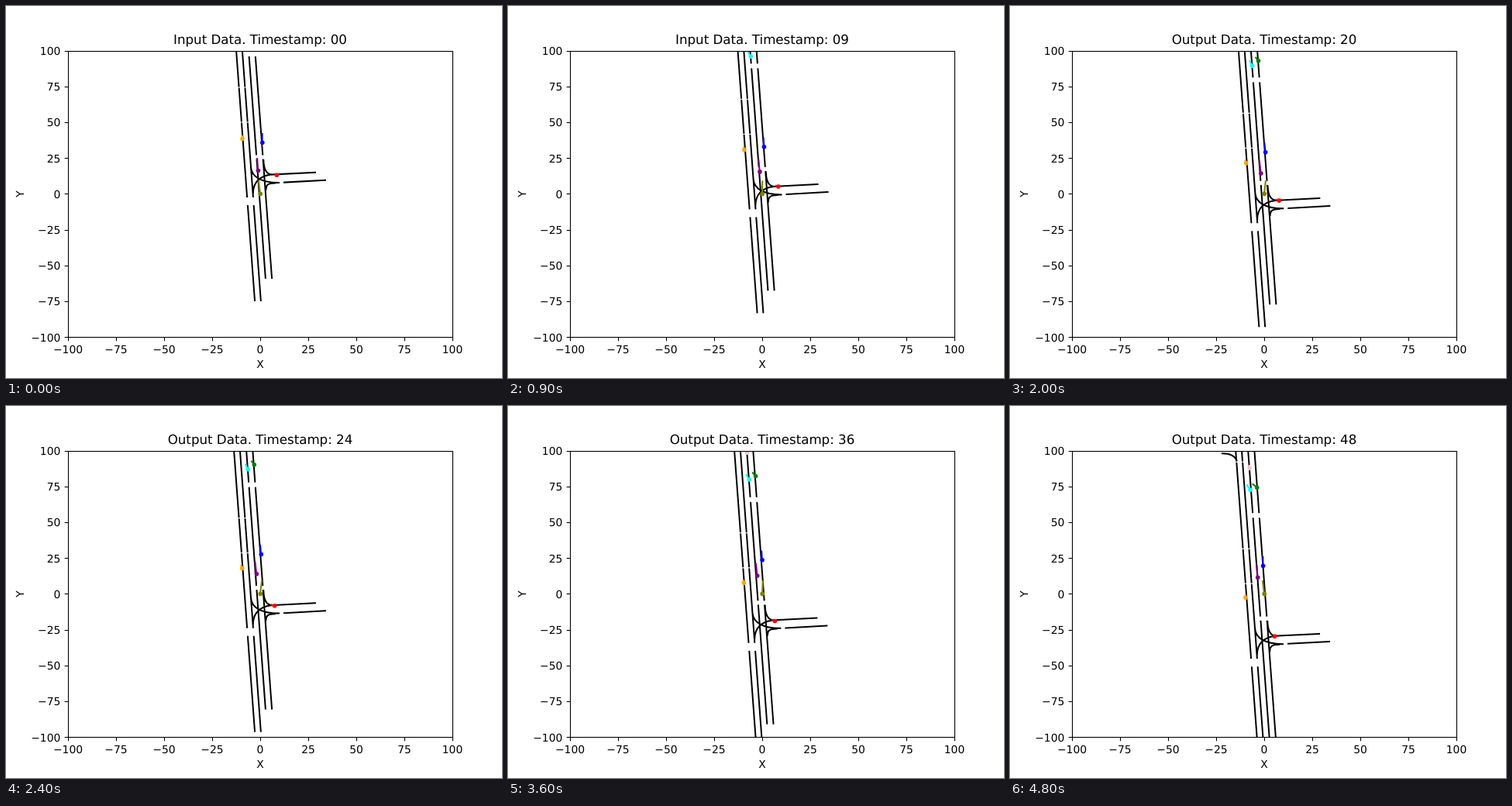
An HTML page with a canvas for the animation above (4.9 s loop, 640 px wide and 480 px high).

```html
<!DOCTYPE html>
<html lang="en">
<head>
<meta charset="utf-8">
<title>Trajectory plot</title>
<style>
html, body { margin: 0; width: 100%; height: 100%; overflow: hidden; background: #fff; }
canvas { display: block; }
</style>
</head>
<body>
<canvas id="plot" width="640" height="480"></canvas>
<script>
const ctx = document.getElementById('plot').getContext('2d');
const STEP = 100, COUNT = 49, LAST = COUNT - 1, INPUT_STEPS = 20;
const SLOPE = .0742;
const FONT = '"DejaVu Sans", sans-serif';

// Start, travel and trailing line (lean, swing of the lean, height), in pixels
const agents = [
  { color: 'orange', x: 304.8, y: 171, dx: -1, dy: 76, lean: 0, swing: -1, rise: 3 },
  { color: 'blue', x: 330.6, y: 176, dx: -4.2, dy: 30, lean: 0, swing: -1, rise: 11 },
  { color: 'purple', x: 325.2, y: 212, dx: -5.7, dy: 9, lean: -1, swing: -.7, rise: 15 },
  { color: 'red', x: 349.2, y: 218, dx: -7.8, dy: 79, lean: -1, swing: -3, rise: 1 },
  { color: 'green', x: 321, y: 46, dx: -2.5, dy: 59, lean: -5, swing: 2, rise: 4 },
  { color: 'cyan', x: 313.3, y: 55, dx: -3.5, dy: 53, lean: -4, swing: 1, rise: 6 },
  { color: 'pink', x: 307, y: 0, dx: 2, dy: 80, lean: 0, swing: -1, rise: 3 },
  { color: 'olive', x: 328, y: 242.2, dx: 0, dy: 0, lean: -2, swing: 4, rise: 16 }
];

// A lane slants from the top down to `end`, interrupted by gaps [centre, length]
function lane(x0, end, gaps) {
  let path = '', y = -30;
  const point = v => `${x0 + SLOPE * v} ${v}`;
  for (const [mid, gap] of [...gaps, [end, 0]]) {
    path += `M${point(y)}L${point(mid - gap / 2)}`;
    y = mid + gap / 2;
  }
  return path;
}

const westGaps = [[-7, 3], [105, 3], [150, 3], [252, 12]];
const eastGaps = [[62, 8], [195, 7]];
const curves = `
  M274-18C283-18 290-15 292.5-9
  M341 217.6L399 214.7M359 227.6L412 224.7
  M316 208C317 219 326 227.6 352 228
  M342 217.6C328 219.5 319 226 318.8 242
  M335.3 237C335.3 231 338 228.6 347 228.6
  M332.3 199C332.6 211 336 217.6 344 217.6`;
const map = new Path2D(
  lane(292.8, 380, westGaps) + lane(300.6, 380, westGaps) +
  lane(308.8, 351, eastGaps) + lane(317, 351, eastGaps) + curves);

function line(x1, y1, x2, y2) {
  ctx.beginPath();
  ctx.moveTo(x1, y1);
  ctx.lineTo(x2, y2);
  ctx.stroke();
}

function text(str, x, y, size = 13.89, align = 'center') {
  ctx.font = `${size}px ${FONT}`;
  ctx.textRendering = 'geometricPrecision';
  ctx.textAlign = align;
  ctx.fillText(str, x, y);
}

function drawMap(n) {
  const wave = .6 * Math.sin(2 * Math.PI * n / LAST);
  ctx.save();
  ctx.translate(wave, 1.65 * n + wave);
  ctx.strokeStyle = '#000';
  ctx.stroke(map);
  ctx.restore();
}

function drawAgent(a, n) {
  const u = n / LAST;
  const x = a.x + a.dx * u ** 1.5, y = a.y + a.dy * u;
  ctx.strokeStyle = ctx.fillStyle = a.color;
  line(x, y, x + a.lean + a.swing * Math.sin(Math.PI * u), y - a.rise);
  ctx.beginPath();
  ctx.arc(x + .2, y + .2, 2.8, 0, 7);
  ctx.fill();
}

function drawAxes() {
  ctx.strokeStyle = ctx.fillStyle = '#000';
  ctx.lineWidth = 1.1;
  ctx.strokeRect(80.5, 58.5, 496, 369);
  for (let i = 0; i <= 8; i++) {
    const label = String(i * 25 - 100).replace('-', '\u2212');
    const x = 80 + 62 * i, y = 427.2 - 46.2 * i, row = Math.round(y) + .5;
    line(x + .5, 427.5, x + .5, 432.3);
    line(75.6, row, 80.5, row);
    text(label, x, 448);
    text(label, 70.3, Math.round(y + 5.3), 13.89, 'right');
  }
  text('X', 328, 467);
  ctx.save();
  ctx.translate(23, 242.4);
  ctx.rotate(-Math.PI / 2);
  text('Y', 0, 0);
  ctx.restore();
}

function draw(n) {
  ctx.fillStyle = '#fff';
  ctx.fillRect(0, 0, 640, 480);
  ctx.save();
  ctx.beginPath();
  ctx.rect(80, 58, 496, 369);
  ctx.clip();
  ctx.lineWidth = 2;
  ctx.lineCap = 'square';
  drawMap(n);
  agents.forEach(a => drawAgent(a, n));
  ctx.restore();
  drawAxes();
  const kind = n < INPUT_STEPS ? 'Input' : 'Output';
  text(`${kind} Data. Timestamp: ${String(n).padStart(2, '0')}`, 328, 49, 16.67);
}

function tick() {
  draw(Math.floor(performance.now() / STEP) % COUNT);
  requestAnimationFrame(tick);
}
tick();
</script>
</body>
</html>
```
